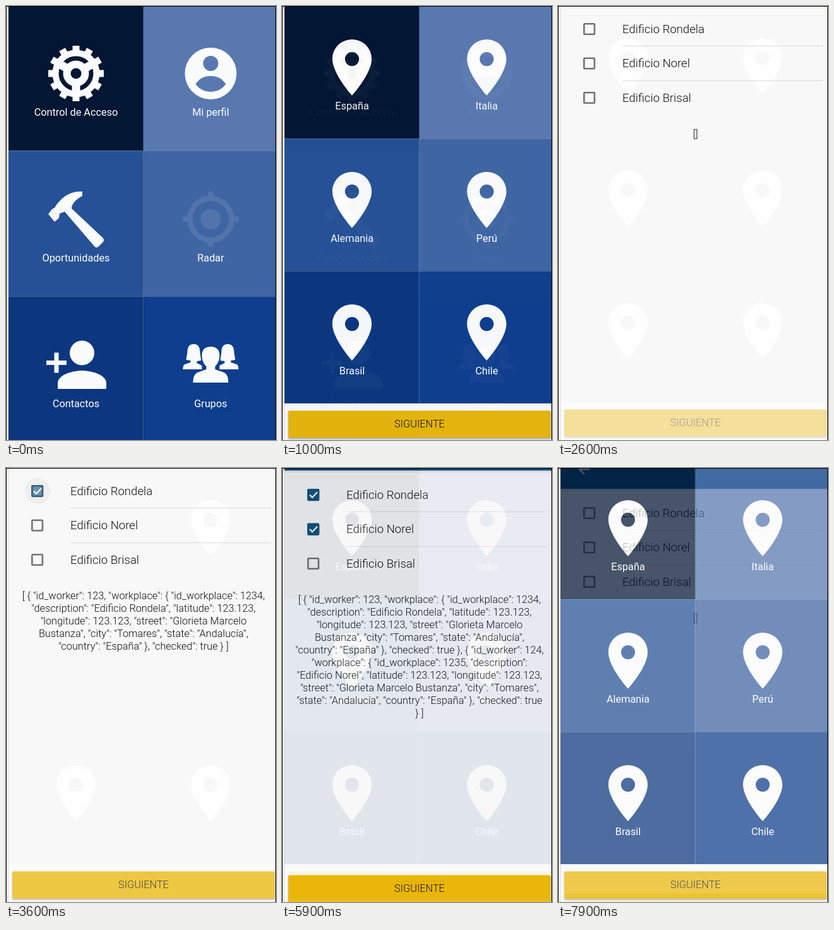
Animation of 428x688 px, one loop 8 s. Source, as an HTML page:

```html
<!DOCTYPE html>
<html lang="es">
<head>
<meta charset="utf-8">
<style>
  html, body { margin: 0; width: 428px; height: 688px; overflow: hidden; background: #000; }
  svg { display: block; }
  text { font: 16.3px Roboto, sans-serif; fill: #fff; text-anchor: middle; white-space: pre; }
  .thin { font-weight: 300; fill: #111; }
  .item { font-size: 18.6px; text-anchor: start; }
  .btn rect { fill: #eab70a; filter: drop-shadow(0 2px 1.5px rgba(0,0,0,.35)); }
</style>
</head>
<body>
<svg id="stage" width="428" height="688"></svg>
<script>
const COLORS = ['#031633', '#5878af', '#265196', '#3f65a3', '#0c377f', '#0e3e8d'];
const MENU = ['Control de Acceso', 'Mi perfil', 'Oportunidades', 'Radar', 'Contactos', 'Grupos'];
const PLACES = ['España', 'Italia', 'Alemania', 'Perú', 'Brasil', 'Chile'];
const BUILDINGS = ['Edificio Rondela', 'Edificio Norel', 'Edificio Brisal'];
const STREET = 'Glorieta Marcelo Bustanza';
const PIN = 'M12 2C8.1 2 5 5.1 5 9c0 5.3 7 13 7 13s7-7.7 7-13c0-3.9-3.1-7-7-7z' +
  'm0 9.5a2.5 2.5 0 1 1 0-5 2.5 2.5 0 0 1 0 5z';

const colX = i => i % 2 ? 324.5 : 111;
const row = i => i >> 1;
const repeat = (n, f) => Array.from({ length: n }, (_, i) => f(i)).join('');
const rect = (x, y, w, h, fill, more = '') =>
  `<rect x="${x}" y="${y}" width="${w}" height="${h}" fill="${fill}" ${more}/>`;
const circle = (x, y, r, more = '') => `<circle cx="${x}" cy="${y}" r="${r}" ${more}/>`;
const path = (d, more = '') => `<path d="${d}" ${more}/>`;
const text = (x, y, s, cls = '') => `<text x="${x}" y="${y}" class="${cls}">${s}</text>`;
const ring = (r, w) => circle(0, 0, r, `fill="none" stroke="#fafbfd" stroke-width="${w}"`);
const spokes = (n, from, to, w, turn = 0) => repeat(n, i =>
  rect(-w / 2, -to, w, to - from, '#fafbfd', `transform="rotate(${turn + i * 360 / n})"`));

const pin = i =>
  path(PIN, `transform="translate(${colX(i) - 53.4} ${42 + 210 * row(i)}) scale(4.45)" fill-rule="evenodd"`);

// Icons are drawn around the centre of their tile's icon area
const woman = 'M-27 -33c8 0 10 6 10 13l2 13-7 1v3l8 4V7H-44c0-7 2-8 6-9l6-2v-3l-7-1 2-12c0-7 2-13 10-13z';
const ICONS = [
  ring(32.5, 10) + spokes(12, 35, 44, 11) + ring(14.5, 12) + spokes(3, 18, 30, 13, 60),
  circle(0, 0, 41) + circle(0, -16, 12, `fill="${COLORS[1]}"`) +
    path('M-24 17Q-16 4 0 4T24 17Q15 29 0 29T-24 17z', `fill="${COLORS[1]}"`),
  path('M10-44C-11-45-25-33-34-18l-4 2-6 8L-34 4l7-6 1-7 8-3L30 44q3 2 6-1l7-7q2-3 0-6' +
    'L-7-17c0-8 9-16 17-20z'),
  ring(33, 8.5) + spokes(4, 33, 44, 9) + circle(0, 0, 16),
  circle(9.5, -19, 19.5) + path('M-29 38v-9C-29 15-4 9 9.5 9S48 15 48 29v9z') +
    path('M-47-3.5h32M-31-19.5v32', 'stroke="#fafbfd" stroke-width="7"'),
  path(woman) + path(woman, 'transform="scale(-1 1)"') +
    path('M0-29c9 0 14 5 14 14 0 7-3 14-7 17v5l14 5q7 3 7 16H-28Q-28 15-21 12L-7 7V2c-4-3-7-10-7-17' +
      ' 0-9 5-14 14-14z', `stroke="${COLORS[5]}" stroke-width="4" paint-order="stroke"`)
];

const tiles = h => repeat(6, i =>
  rect(i % 2 ? 217.5 : 4, -2 + h * row(i), i % 2 ? 210 : 213.5, h, COLORS[i])) +
  path(`M4 ${h - 1.5}H427M4 ${2 * h - 1.5}H427M217.5 ${h}V${3 * h - 2}`,
    'stroke="#fff" stroke-opacity=".2" fill="none"');

const header = rect(4, -62, 423, 60, '#0a4d79') + rect(4, -2, 423, 3, '#000', 'opacity=".08"') +
  path('M50-33H34M42-41L34-33L42-25', 'stroke="#fff" stroke-width="2.4" fill="none"');
const footer = id => rect(4, 628, 423, 100, '#fcfcfc') +
  `<g class="btn" id="${id}">${rect(10, 639.5, 416, 43, '', 'rx="1.5"')}${text(218, 666, 'SIGUIENTE', 'thin')}</g>`;

const rowY = i => 36.5 + 54.5 * i;
const listRow = i => `<svg x="4" y="${rowY(i) - 27}" width="423" height="55">` +
  circle(46, 27, 0, `id="ripple${i}" fill="#555"`) + '</svg>' +
  rect(41.3, rowY(i) - 8.3, 16.6, 16.6, 'none', 'rx="1.2" stroke="#737373" stroke-width="2.6"') +
  `<g id="tick${i}">${rect(40, rowY(i) - 9.5, 19.2, 19.2, '#11557f', 'rx="2.2"')}` +
  path(`M44 ${rowY(i)}l4 4.2 8-8.4`, 'stroke="#fff" stroke-width="2.3" fill="none"') + '</g>' +
  text(102, rowY(i) + 6.3, BUILDINGS[i], 'thin item') +
  (i < 2 ? rect(102, 63 + 55 * i, 318, 1, '#dcdcdc') : '');

const stage = document.getElementById('stage');
stage.innerHTML = rect(1, 1, 3, 687, '#fff') + rect(3, 1, 1, 687, '#ddd') +
  `<svg x="4" y="1" width="423" height="687" viewBox="4 1 423 687">
    <g fill="#fafbfd">${tiles(231)}${repeat(6, i =>
      `<g id="icon${i}" transform="translate(${colX(i)} ${107 + 231 * row(i)})">${ICONS[i]}</g>` +
      text(colX(i), 173.5 + 231 * row(i), MENU[i]))}</g>
    <g id="places" fill="#fefefe">${header}${tiles(210)}${repeat(6, i =>
      pin(i) + text(colX(i), 162 + 210 * row(i), PLACES[i]))}${footer('next')}</g>
    <g id="list">${rect(4, -2, 423, 740, '#f8f8f8')}${header}
      <g fill="#fff" opacity=".8">${repeat(6, i => `<g id="faint${i}">${pin(i)}</g>`)}</g>
      ${repeat(3, listRow)}<g id="json"></g>${footer('send')}</g>
  </svg>`;

const el = id => document.getElementById(id);
const opacity = (id, v) => el(id).setAttribute('opacity', v);

const OUTPUTS = [
  ['[]'],
  ['[ { "id_worker": 123, "workplace": { "id_workplace": 1234,',
    '"description": "Edificio Rondela", "latitude": 123.123,',
    '"longitude": 123.123, "street": "Glorieta Marcelo',
    'Bustanza", "city": "Tomares", "state": "Andalucía",',
    '"country": "España" }, "checked": true } ]']
];
OUTPUTS.push([...OUTPUTS[1].slice(0, 4),
  '"country": "España" }, "checked": true }, { "id_worker": 124,',
  '"workplace": { "id_workplace": 1235, "description":',
  '"Edificio Norel", "latitude": 123.123, "longitude": 123.123,',
  `"street": "${STREET}", "city": "Tomares",`,
  '"state": "Andalucía", "country": "España" }, "checked": true',
  '} ]']);
let shown = -1;
function showOutput(n) {
  if (n === shown) return;
  shown = n;
  el('json').innerHTML = OUTPUTS[n].map((s, i) => text(218, 207.5 + 20 * i, s, 'thin')).join('');
}

// The screen refreshes every 100 ms: pick the value for the current step
const step = (t, start, before, values) =>
  t < start ? before : values[Math.min(values.length - 1, Math.floor((t - start) / 100))];

function slide(id, p) {
  el(id).setAttribute('transform', `translate(0 ${Math.round(40 * (1 - p))})`);
  opacity(id, p ** .6);
}

function draw(t) {
  opacity('icon3', step(t, 0, 0, [.1, 0, 0, .35, .7, 1]));
  slide('places', step(t, 800, 0, [.12, .6, .95, .99, 1]));
  const p = t < 5900 ? step(t, 2200, 0, [.002, .45, .9, .98, 1])
    : t < 7900 ? step(t, 5900, 1, [.85, .35, 0]) : .12;
  slide('list', p);

  const fresh = t >= 6100;
  const ticks = [3500, 4200].map(s => fresh ? 0 : step(t, s, 0, [.25, .6, .85, 1]));
  [...ticks, 0].forEach((a, i) => {
    opacity('tick' + i, a);
    el('ripple' + i).setAttribute('r', 34 * a);
    opacity('ripple' + i, .15 * (1 - a));
  });
  opacity('send', .4 + .6 * ticks[0]);
  showOutput(ticks.filter(a => a > 0).length);
  for (let i = 0; i < 6; i++)
    opacity('faint' + i, p === 1 && (!ticks[0] || i === 1 || i > 3) ? 1 : 0);
}

const begin = performance.now();
(function frame() {
  draw((performance.now() - begin) % 8000);
  requestAnimationFrame(frame);
})();
</script>
</body>
</html>
```
